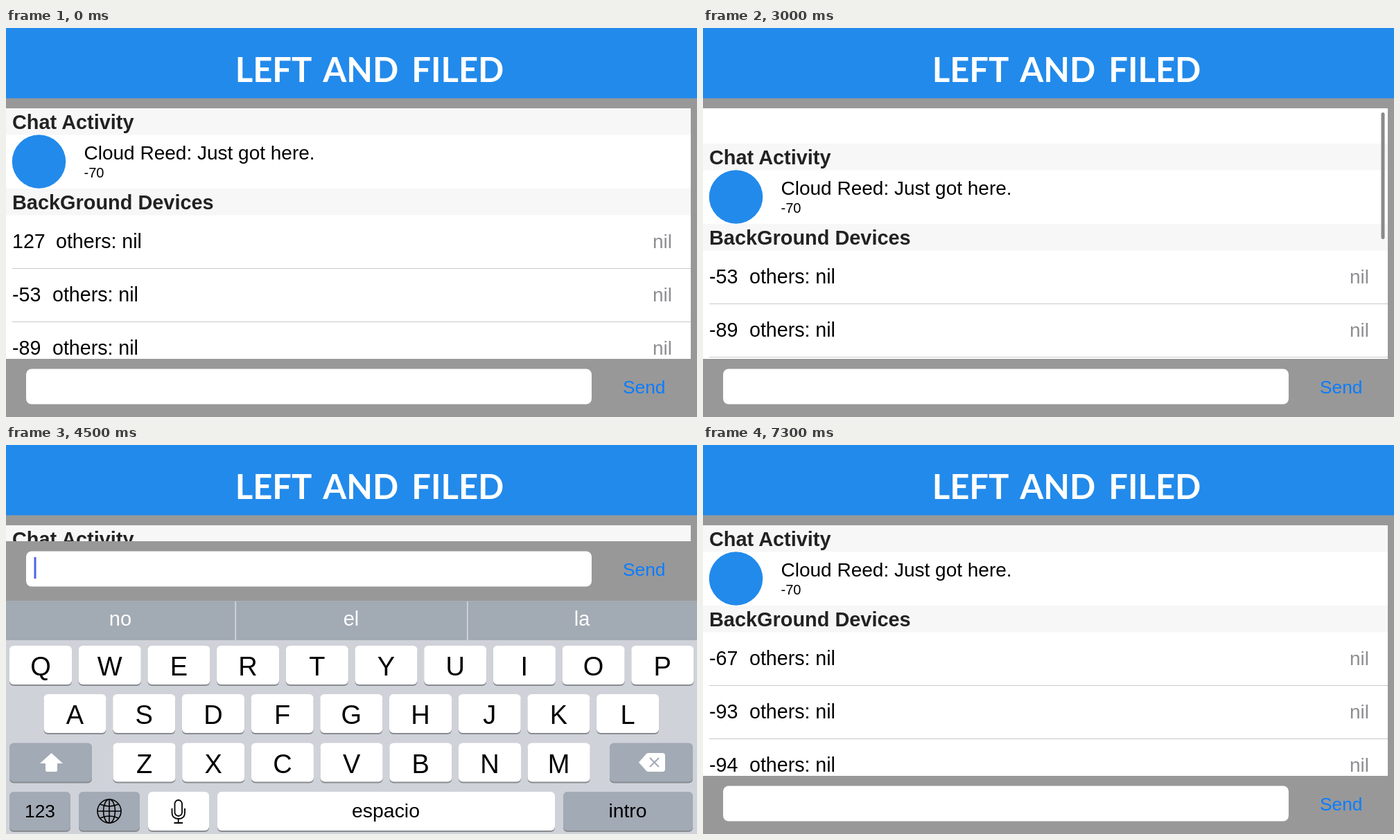
Write an HTML page that moves like this. It is 997 px wide and 562 px high and loops after 7.7 s.

```html
<!DOCTYPE html>
<html lang="en">
<head>
<meta charset="utf-8">
<title>Left and Filed</title>
<style>
  html, body { margin: 0; width: 100%; height: 100%; overflow: hidden; background: #989898; }
  svg { display: block; }
  #stage { position: absolute; left: 0; top: 0; }
  text { font-family: "Liberation Sans", Arial, sans-serif; font-size: 28px; white-space: pre; }
  .title { font: 700 49px Lato, sans-serif; word-spacing: 7px; fill: #fff; }
  .head { font-size: 28.9px; font-weight: 700; fill: #222; }
  .row { font-size: 28.6px; }
  .small { font-size: 20px; }
  .nil { fill: #8e8e93; text-anchor: end; }
  .send { font-size: 26.3px; fill: #0b7cff; }
  .band { fill: #f7f7f7; }
  .line { fill: #c9c9cc; }
  .key, .word { text-anchor: middle; }
  .key { font-size: 38px; }
  .word { font-size: 29px; fill: #fff; }
  .label { font-size: 28.4px; }
  .digits { font-size: 26.3px; }
</style>
</head>
<body>
<svg id="stage" width="997" height="562" viewBox="0 0 997 562">
  <rect width="997" height="562" fill="#989898"/>
  <rect width="997" height="101.5" fill="#228aeb"/>
  <text class="title" x="524.5" y="78" text-anchor="middle">LEFT AND FILED</text>

  <svg id="list" y="116" width="988" height="362" overflow="hidden">
    <rect width="988" height="362" fill="#fff"/>
    <g id="content">
      <rect class="band" width="988" height="38.5"/>
      <text class="head" x="9" y="30">Chat Activity</text>
      <circle cx="47.5" cy="77" r="38.7" fill="#228aeb"/>
      <text x="112.5" y="74">Cloud Reed: Just got here.</text>
      <text class="small" x="112.5" y="100">-70</text>
      <rect class="band" y="116" width="988" height="38.5"/>
      <text class="head" x="9" y="146">BackGround Devices</text>
      <g id="rows"></g>
    </g>
    <rect id="thumb" x="978.5" y="6" width="5" height="228" rx="2.5" fill="#8a8a8a"/>
  </svg>

  <g id="bar">
    <rect x="29" y="492.5" width="816" height="51" rx="8" fill="#fff"/>
    <rect id="caret" x="40.5" y="501" width="3" height="31" fill="#4c63e6"/>
    <text class="send" x="890" y="528">Send</text>
  </g>

  <g id="board"></g>
</svg>
<script>
const LOOP = 7700, STEP = 100;
const PULLS = [0, 2700];          // start of each drag on the list
const OPEN = 4075, CLOSE = 4929;  // keyboard slides
const TRAVEL = 338;
const LEVELS = [
  [0, ["127", "-53", "-89"]],
  [1700, ["-53", "-89", "-94"]],
  [6100, ["-67", "-93", "-94"]]
];

const $ = id => document.getElementById(id);
const list = $("list"), content = $("content"), thumb = $("thumb");
const bar = $("bar"), caret = $("caret"), board = $("board");

const rect = (x, y, w, h, fill, r = 0) =>
  `<rect x="${x}" y="${y}" width="${w}" height="${h}" rx="${r}" fill="${fill}"/>`;
const text = (cls, x, y, s) => `<text class="${cls}" x="${x}" y="${y}">${s}</text>`;

function buildRows() {
  $("rows").innerHTML = [0, 1, 2].map(i => {
    const y = 202 + 77.2 * i;
    return `<text class="row" x="9" y="${y}"><tspan class="level"></tspan><tspan class="rest">others: nil</tspan></text>`
      + text("nil", 961, y, "nil")
      + `<rect class="line" x="9" y="${Math.round(y + 29)}" width="979" height="1"/>`;
  }).join("");
}

function buildBoard() {
  const dark = "#a2aab5";
  const cap = (x, y, w, fill = "#fff") =>
    rect(x, y + 2, w, 56, "#888b90", 6) + rect(x, y, w, 56, fill, 6);
  const keys = (letters, x0, y) => [...letters].map((c, i) => {
    const x = x0 + 99.7 * i;
    return cap(x, y, 90) + text("key", x + 45, y + 43, c);
  }).join("");

  let out = rect(0, 224.5, 997, 340, "#cfd2d8") + rect(0, 224.5, 997, 56.5, "#a2aab4");
  out += rect(330.5, 225, 1.5, 56, "#d8dbe0") + rect(665, 225, 1.5, 56, "#d8dbe0");
  ["no", "el", "la"].forEach((w, i) => { out += text("word", 165 + 333 * i, 260, w); });

  out += `<g transform="translate(0 -1)">`;
  out += keys("QWERTYUIOP", 5, 290) + keys("ASDFGHJKL", 54.5, 360) + keys("ZXCVBNM", 154.5, 430.5);

  out += cap(5, 430.5, 119, dark)
    + `<path d="M65.5 445L82 460H74V470Q74 472 72 472H59Q57 472 57 470V460H49Z" fill="#fff"/>`;
  out += cap(871, 430.5, 120, dark)
    + `<path d="M913 458.5L924 446Q925 445 927 445H947Q951 445 951 449V468Q951 472 947 472H927Q925 472 924 471Z" fill="#fff"/>`
    + `<path d="M929 452L942 465M942 452L929 465" stroke="${dark}" stroke-width="2"/>`;

  out += cap(5, 501, 88, dark) + text("key digits", 49, 538, "123");
  out += cap(105, 501, 88, dark)
    + `<g fill="none" stroke="#000" stroke-width="1.6"><circle cx="149" cy="529" r="17"/>`
    + `<ellipse cx="149" cy="529" rx="8.5" ry="17"/>`
    + `<path d="M149 512V546M132 529H166M136 519Q149 525 162 519M136 539Q149 533 162 539"/></g>`;
  out += cap(205, 501, 88)
    + `<g fill="none" stroke="#000" stroke-width="1.8"><rect x="243.5" y="513" width="10.5" height="23" rx="5.2"/>`
    + `<path d="M239.5 525V531Q239.5 540 248.7 540T258 531V525M248.7 540V546M242.5 546H255"/></g>`;
  out += cap(305, 501, 487) + text("key label", 548, 537.5, "espacio");
  out += cap(804, 501, 187, dark) + text("key label", 897, 537.5, "intro");
  board.innerHTML = out + "</g>";
}

// Critically damped spring, 0 to 1
const spring = (s, w) => s <= 0 ? 0 : 1 - (1 + w * s) * Math.exp(-w * s);

function pull(s) {
  if (s <= 0) return 0;
  const peak = 60;
  return s < 0.4 ? peak * Math.sin(s / 0.4 * Math.PI / 2) ** 2 : peak * (1 - spring(s - 0.4, 13));
}

function draw(time) {
  const t = Math.floor(time % LOOP / STEP) * STEP;

  const start = PULLS.filter(p => p <= t).pop();
  const s = (t - start) / 1000;
  const shift = Math.round(pull(s));
  content.setAttribute("transform", `translate(0 ${shift})`);
  thumb.setAttribute("height", 234 - shift);
  thumb.setAttribute("opacity", s > 0 ? Math.max(0, Math.min(1, (1.2 - s) / 0.4)) : 0);

  const values = LEVELS.filter(l => l[0] <= t).pop()[1];
  document.querySelectorAll(".level").forEach((n, i) => { n.textContent = values[i]; });
  document.querySelectorAll(".rest").forEach((n, i) => {
    n.setAttribute("x", values[i][0] === "-" ? 67 : 72);
  });

  const editing = t >= OPEN && t < CLOSE;
  list.setAttribute("height", editing ? 23 : 362);
  bar.setAttribute("transform", `translate(0 ${editing ? -339 : 0})`);
  caret.setAttribute("visibility", editing ? "visible" : "hidden");

  const up = spring((t - OPEN) / 1000, 18.3) - spring((t - CLOSE) / 1000, 18.3);
  board.setAttribute("transform", `translate(0 ${Math.round(TRAVEL * (1 - up))})`);
  board.setAttribute("visibility", up > 0.002 ? "visible" : "hidden");
}

buildRows();
buildBoard();
const begin = performance.now();
function tick() {
  draw(performance.now() - begin);
  requestAnimationFrame(tick);
}
tick();
</script>
</body>
</html>
```
